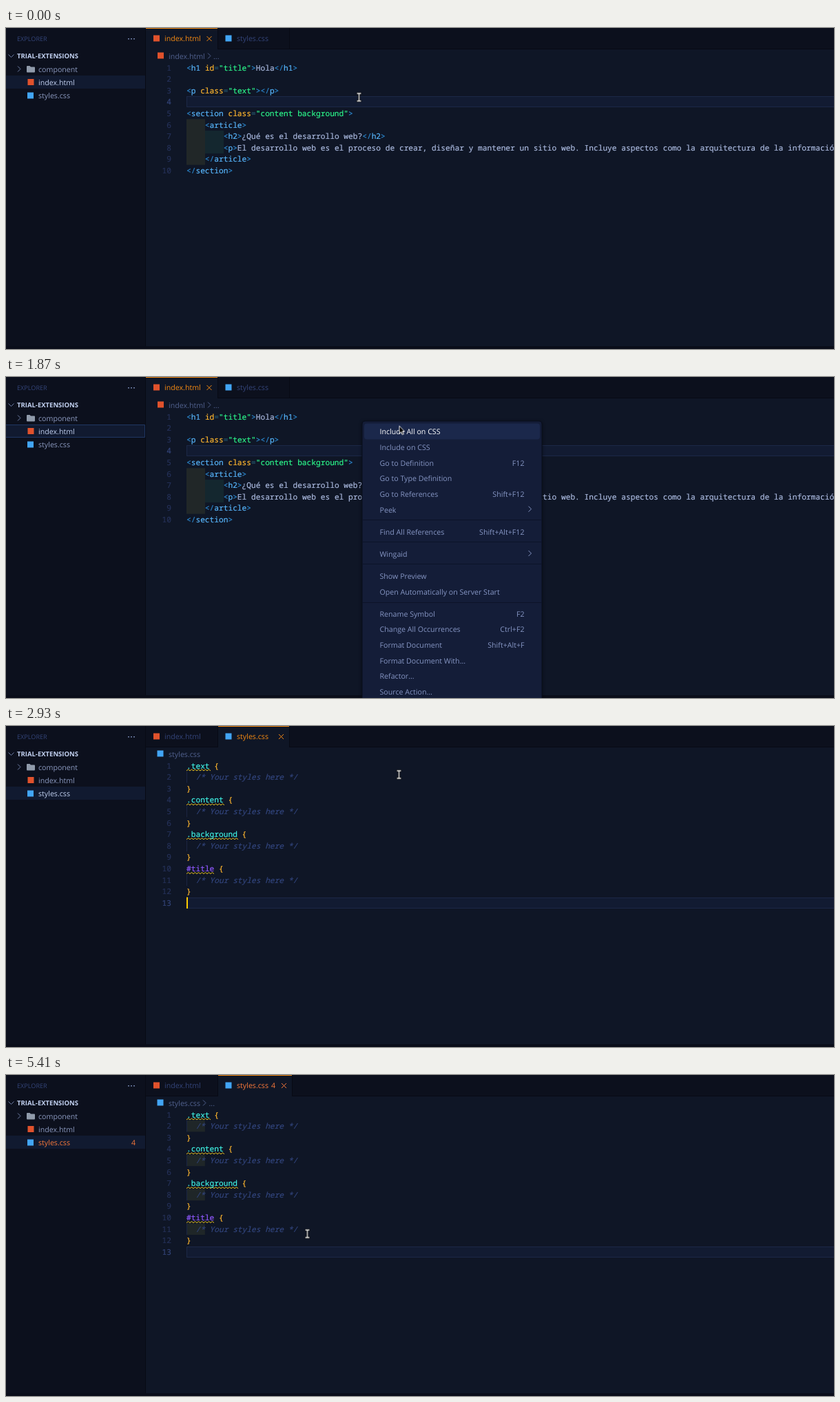
Write an HTML page that moves like this. It is 1202 px wide and 466 px high and loops after 5680 ms.

```html
<!DOCTYPE html>
<html lang="en">
<head>
<meta charset="utf-8">
<title>Editor: include selectors on CSS</title>
<style>
html, body { margin: 0; width: 100%; height: 100%; overflow: hidden; background: #0f1626; }
svg { display: block; width: 100%; height: 100%; }
text { font: 10.65px "Open Sans", "Noto Sans", sans-serif; white-space: pre; text-rendering: geometricPrecision; }
.code text {
  font: 11.2px "Noto Sans Mono", "DejaVu Sans Mono", monospace;
  color: #a9b8dd; fill: currentColor; stroke: currentColor; stroke-width: .2;
}
.line { fill: none; stroke-width: 1; }

.dim { fill: #34457a; }
.soft { fill: #8c9ac0; }
.crumb { fill: #52628f; }
.bright { fill: #c3d2f2; }
.active { fill: #f58a12; }
.warn { fill: #f9793a; }
.html-icon { fill: #e0522c; }
.css-icon { fill: #42a5f5; }

.code .punct { color: #2b86cc; }
.code .tag { color: #57b4fa; }
.code .attr, .code .brace { color: #ffb62f; }
.code .eq { color: #24546a; }
.code .str { color: #2cf58a; }
.code .cls { color: #3ff2e4; }
.code .id { color: #9059ff; }
.code .comment { color: #32457d; font-style: italic; }
.code .number { color: #26325a; text-anchor: end; }
.code .current { color: #34457a; }
.current-line { fill: #121b32; stroke: #1c2847; }
.caret { fill: #ffcc00; }
.squiggle { stroke: #eec41c; }

.menu text { fill: #8696c4; }
.menu .key { text-anchor: end; }
.hover.hover text { fill: #fff; }
.hover rect { fill: #1b284b; }

/* Percentages are milliseconds / 56.8 */
.html-view, .css-view, .clean, .warned, .parsed, .html-caret, .css-caret,
.menu, .hover, .arrow, .beam, .pointer { animation: 5680ms step-end infinite; }
.html-view { animation-name: html-view; }
.css-view { animation-name: css-view; }
.clean { animation-name: clean; }
.warned { animation-name: warned; }
.parsed { animation-name: parsed; }
.html-caret { animation-name: html-caret; }
.css-caret { animation-name: css-caret; }
.menu { animation-name: menu; }
.hover.first { animation-name: hover-first; }
.hover.second { animation-name: hover-second; }
.arrow { animation-name: arrow; }
.beam { animation-name: beam; }
.pointer { animation-name: pointer; }

@keyframes html-view { 0% { visibility: visible } 50.35%, 100% { visibility: hidden } }
@keyframes css-view { 0% { visibility: hidden } 50.35%, 100% { visibility: visible } }
@keyframes clean { 0% { visibility: hidden } 50.35% { visibility: visible } 52.64%, 100% { visibility: hidden } }
@keyframes warned { 0% { visibility: hidden } 52.64%, 100% { visibility: visible } }
@keyframes parsed { 0% { visibility: hidden } 57.57%, 100% { visibility: visible } }
@keyframes html-caret { 0% { visibility: hidden } 2.11% { visibility: visible } 11.44%, 100% { visibility: hidden } }
@keyframes css-caret {
  50.35%, 69.19%, 85.91% { visibility: visible }
  0%, 59.85%, 77.64%, 95.24%, 100% { visibility: hidden }
}
@keyframes menu { 0% { visibility: hidden } 21.12% { visibility: visible } 49.29%, 100% { visibility: hidden } }
@keyframes hover-first { 0% { visibility: hidden } 30.45% { visibility: visible } 49.29%, 100% { visibility: hidden } }
@keyframes hover-second { 0% { visibility: hidden } 28.16% { visibility: visible } 30.45%, 100% { visibility: hidden } }
@keyframes arrow { 0% { visibility: hidden } 21.12% { visibility: visible } 45.77%, 100% { visibility: hidden } }
@keyframes beam { 0% { visibility: visible } 21.12% { visibility: hidden } 45.77%, 100% { visibility: visible } }
@keyframes pointer {
  0% { transform: translate(512.5px, 100.5px) }
  13.1% { transform: translate(512.5px, 100.5px); animation-timing-function: steps(5, start) }
  21.12% { transform: translate(515.5px, 102.5px) }
  28.16% { transform: translate(515.5px, 102.5px); animation-timing-function: steps(5, start) }
  34.1% { transform: translate(570.5px, 70.5px) }
  82.04% { transform: translate(570.5px, 70.5px); animation-timing-function: steps(4, start) }
  87.2%, 100% { transform: translate(437.5px, 230.5px) }
}
</style>
</head>
<body>
<svg viewBox="0 0 1202 466">
  <rect width="1202" height="466" fill="#0f1626"/>
  <rect width="203" height="466" fill="#0c101d"/>
  <rect x="203" width="999" height="30" fill="#0c101d"/>
  <path class="line" stroke="#070a14" d="M202.5 0V462M203 30.5H1202"/>

  <text class="dim" x="16" y="19" style="font-size:9.1px">EXPLORER</text>
  <path fill="#7080a8" d="M177 15h2v1.5h-2zM181 15h2v1.5h-2zM185 15h2v1.5h-2z"/>
  <path class="line" stroke="#7080a8" d="M3.5 38.5l4 4 4-4M17 55.5l4 4-4 4"/>
  <text class="bright" x="16" y="44" style="font-size:9.5px;font-weight:700">TRIAL-EXTENSIONS</text>
  <path fill="#909bab" d="M30 56q0-1 1-1h3.5l1.5 1.5h5q1 0 1 1v6q0 1-1 1h-10q-1 0-1-1z"/>
  <text class="soft" x="47" y="63.5">component</text>

  <g class="html-view">
    <rect y="69" width="202" height="19" fill="#111a30"/>
    <text class="bright" x="47" y="83">index.html</text>
    <text class="soft" x="47" y="102">styles.css</text>
    <rect x="203" width="104" height="31" fill="#0f1626"/>
    <rect x="203" width="104" height="1" fill="#f58a12"/>
    <path class="line" stroke="#070a14" d="M307.5 0V30M411.5 0V30"/>
    <text class="active" x="230" y="19">index.html</text>
    <path class="line" stroke="#f58a12" d="M291.5 12l7 7m0-7l-7 7"/>
    <text class="dim" x="335" y="19">styles.css</text>
    <rect class="html-icon" x="220" y="35.5" width="9" height="9"/>
    <text class="crumb" x="236" y="44.5">index.html</text>
    <path class="line" stroke="#52628f" d="M293 36.5l4 4-4 4"/>
    <text class="crumb" x="301" y="44.5">...</text>
    <g class="code" id="html-code">
      <rect class="current-line" x="262.5" y="99.5" width="941" height="15"/>
      <rect x="262" y="132.3" width="27" height="66.4" fill="#212728"/>
      <rect x="289" y="149" width="27" height="33.2" fill="#14272f"/>
    </g>
    <rect class="caret html-caret" x="262" y="99" width="2" height="17"/>
  </g>

  <g class="css-view">
    <rect y="88" width="202" height="19" fill="#111a30"/>
    <text class="soft" x="47" y="83">index.html</text>
    <text class="dim" x="230" y="19">index.html</text>
    <g class="clean">
      <text class="bright" x="47" y="102">styles.css</text>
      <rect x="308" width="103" height="31" fill="#0f1626"/>
      <rect x="308" width="103" height="1" fill="#f58a12"/>
      <path class="line" stroke="#070a14" d="M307.5 0V30M411.5 0V30"/>
      <text class="active" x="335" y="19">styles.css</text>
      <path class="line" stroke="#f58a12" d="M396 12l7 7m0-7l-7 7"/>
    </g>
    <g class="warned">
      <text class="warn" x="47" y="102">styles.css</text>
      <text class="warn" x="182" y="102">4</text>
      <rect x="308" width="107" height="31" fill="#0f1626"/>
      <rect x="308" width="107" height="1" fill="#f58a12"/>
      <path class="line" stroke="#070a14" d="M307.5 0V30M415.5 0V30"/>
      <text class="warn" x="335" y="19">styles.css</text>
      <text class="warn" x="385" y="19">4</text>
      <path class="line" stroke="#f9793a" d="M400 12l7 7m0-7l-7 7"/>
    </g>
    <rect class="css-icon" x="219.5" y="35.5" width="9" height="9"/>
    <text class="crumb" x="236" y="44.5">styles.css</text>
    <g class="parsed">
      <path class="line" stroke="#52628f" d="M286 36.5l4 4-4 4"/>
      <text class="crumb" x="294.5" y="44.5">...</text>
    </g>
    <g class="code" id="css-code">
      <rect class="current-line" x="262.5" y="249.5" width="941" height="15"/>
      <g class="parsed" id="indents"></g>
    </g>
    <rect class="caret css-caret" x="262" y="248.5" width="2" height="16.5"/>
  </g>

  <rect class="html-icon" x="31.5" y="74" width="9" height="9"/>
  <rect class="css-icon" x="31" y="93.5" width="9" height="9"/>
  <rect class="html-icon" x="214" y="10.5" width="9" height="9"/>
  <rect class="css-icon" x="318.5" y="10.5" width="9" height="9"/>
  <rect y="462" width="1202" height="4" fill="#0a0d19"/>

  <g class="menu">
    <path class="line" stroke="#1f3763" d="M0 69.5H201.5V87.5H0"/>
    <g id="menu">
      <rect x="517" y="64" width="261" height="420" rx="4" fill="#141d38" stroke="#090e1c"
        style="filter:drop-shadow(0 1px 2px #0008)"/>
      <path class="line" stroke="#0c1328" d="M517 207.5h261M517 239.5h261M517 271.5h261M517 327.5h261"/>
    </g>
  </g>

  <g class="pointer">
    <g class="beam">
      <path class="line" stroke="#000" style="stroke-width:3" d="M-3.5-5.5H3.5M0-5.5V5.5M-3.5 5.5H3.5"/>
      <path class="line" stroke="#fff" style="stroke-width:1.3" d="M-3-5.5H3M0-5.5V5.5M-3 5.5H3"/>
    </g>
    <path class="arrow" fill="#000" stroke="#fff" stroke-width=".9" d="M.5.5V11.5l2.5-2.3 1.8 4 1.8-.8-1.8-3.9H8z"/>
  </g>
</svg>
<script>
const LEFT = 262, CHAR = 6.72, ROW = 16.62;
const byId = id => document.getElementById(id);
const rowTop = i => 49.2 + ROW * i;

function add(parent, name, attrs, content = '') {
  const el = document.createElementNS('http://www.w3.org/2000/svg', name);
  for (const key in attrs) el.setAttribute(key, attrs[key]);
  el.textContent = content;
  return parent.appendChild(el);
}

const grammars = {
  html: /(?<punct><\/?|>)|(?<tag>(?<=<\/?)\w+)|(?<attr>\w+(?==))|(?<eq>=)|(?<str>"[^"]*")|(?<plain>\s+|[^\s<>="]+)/g,
  css: /(?<cls>\.\w+)|(?<id>#\w+)|(?<brace>[{}])|(?<comment>\/\*.*\*\/)|(?<plain>\s+)/g
};

function addCode(parent, lines, grammar, current) {
  lines.forEach((line, i) => {
    const y = rowTop(i) + 12.3;
    add(parent, 'text', { x: 240, y, class: i + 1 === current ? 'number current' : 'number' }, i + 1);
    const text = add(parent, 'text', { x: LEFT, y });
    for (const { 0: token, groups } of line.matchAll(grammar)) {
      const kind = Object.keys(groups).find(key => groups[key]);
      add(text, 'tspan', { class: kind }, token);
    }
  });
}

addCode(byId('html-code'), [
  '<h1 id="title">Hola</h1>',
  '',
  '<p class="text"></p>',
  '',
  '<section class="content background">',
  '    <article>',
  '        <h2>¿Qué es el desarrollo web?</h2>',
  '        <p>El desarrollo web es el proceso de crear, diseñar y mantener un sitio web. ' +
    'Incluye aspectos como la arquitectura de la información',
  '    </article>',
  '</section>'
], grammars.html, 4);

const selectors = ['.text', '.content', '.background', '#title'];
const cssCode = byId('css-code');
selectors.forEach((name, i) => {
  const body = rowTop(i * 3 + 1);
  add(byId('indents'), 'rect', { x: LEFT, y: body, width: CHAR * 4, height: ROW, fill: '#1f2628' });
  add(cssCode, 'rect', { x: LEFT, y: body, width: 1, height: ROW, fill: '#1b2542' });
  const waves = Math.round(name.length * CHAR / 5);
  add(cssCode, 'path', {
    class: 'line squiggle',
    d: `M${LEFT} ${rowTop(i * 3) + 15.8}` + 'l2.5-2 2.5 2'.repeat(waves)
  });
});
addCode(cssCode, [
  ...selectors.flatMap(name => [name + ' {', '  /* Your styles here */', '}']), ''
], grammars.css, 13);

// Each item: vertical centre, label, shortcut ('>' opens a submenu)
const items = [
  [79, 'Include All on CSS'], [102, 'Include on CSS'],
  [124.5, 'Go to Definition', 'F12'], [147.3, 'Go to Type Definition'],
  [170, 'Go to References', 'Shift+F12'], [192.7, 'Peek', '>'],
  [225, 'Find All References', 'Shift+Alt+F12'], [257, 'Wingaid', '>'],
  [289, 'Show Preview'], [311.5, 'Open Automatically on Server Start'],
  [343.5, 'Rename Symbol', 'F2'], [366.3, 'Change All Occurrences', 'Ctrl+F2'],
  [389, 'Format Document', 'Shift+Alt+F'], [411.7, 'Format Document With...'],
  [434.3, 'Refactor...'], [457, 'Source Action...']
];
const menu = byId('menu');
for (const [y, label, key] of items) {
  add(menu, 'text', { x: 542.5, y: y + 4 }, label);
  if (key === '>') add(menu, 'path', { class: 'line', stroke: '#8696c4', d: `M758.5 ${y - 5}l4 4-4 4` });
  else if (key) add(menu, 'text', { class: 'key', x: 752.5, y: y + 4 }, key);
}
['first', 'second'].forEach((name, i) => {
  const [y, label] = items[i];
  const hover = add(menu, 'g', { class: 'hover ' + name });
  add(hover, 'rect', { x: 520, y: y - 11.5, width: 255, height: 23, rx: 4 });
  add(hover, 'text', { x: 542.5, y: y + 4 }, label);
});
</script>
</body>
</html>
```
